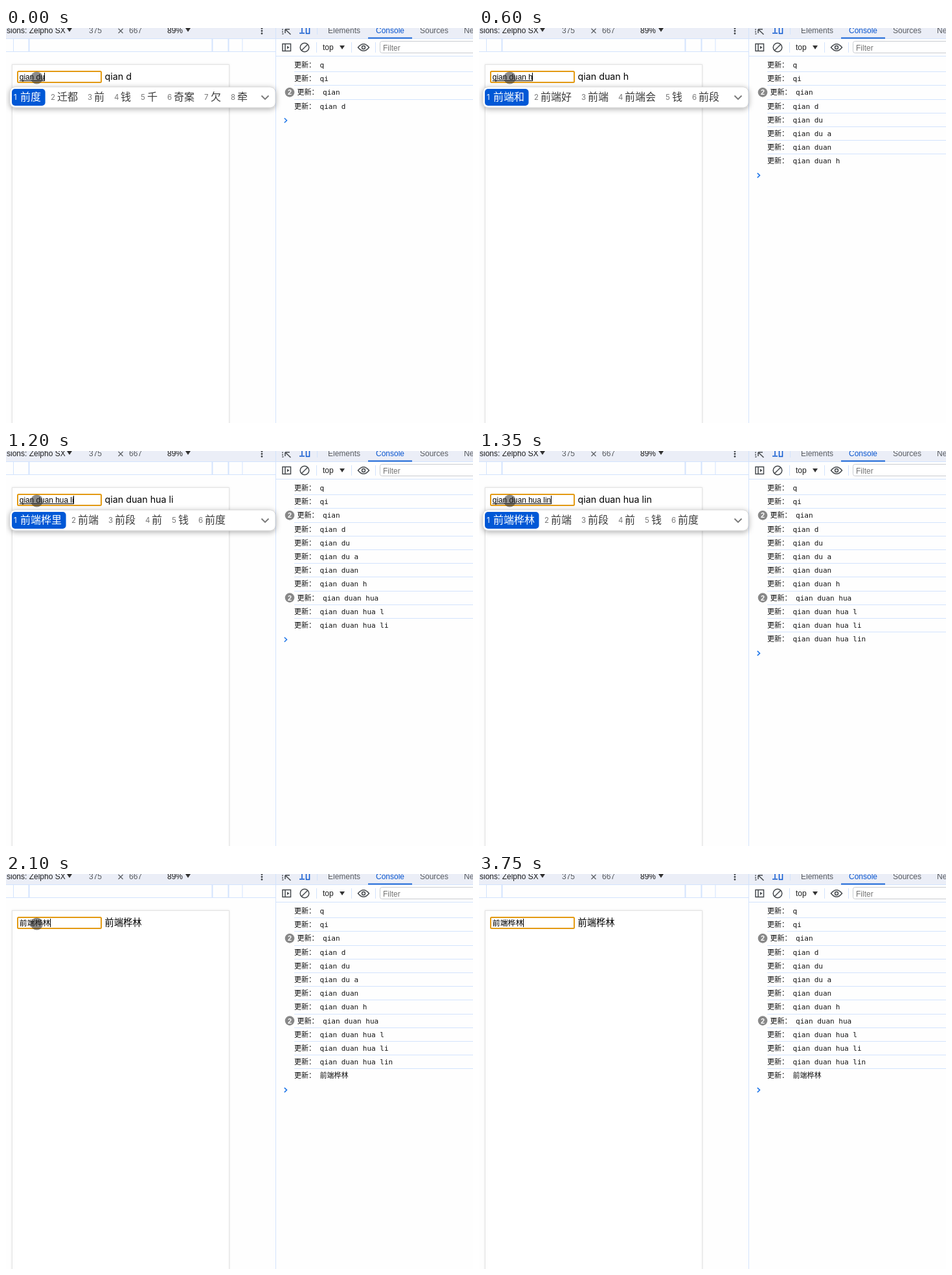
An HTML page that plays this animation: 721 px wide and 610 px high, repeating every 3770 ms.

```html
<!DOCTYPE html>
<html lang="zh">
<head>
<meta charset="utf-8">
<title>Input method and console log</title>
<style>
  html, body { margin: 0; width: 721px; height: 610px; overflow: hidden; background: #fff; }
  svg { display: block; }
  text { font: 12px "Liberation Sans", "Noto Sans CJK SC", "Noto Sans CJK", sans-serif; fill: #1f1f1f; white-space: pre; }
  #typed { font-size: 11.87px; fill: #000; }
  #shown { font: 14.24px Inter, "Noto Sans CJK SC", "Noto Sans CJK", sans-serif; fill: #000; }
  #log text { font: 11px "DejaVu Sans Mono", "Noto Sans CJK SC", "Noto Sans CJK", monospace; fill: #111; }
  #log .count { font: bold 11px "Liberation Sans", sans-serif; fill: #fff; text-anchor: middle; }
  #items text { font-size: 16px; fill: #3c3c3c; }
  #items .num { font: 11.5px Inter, sans-serif; fill: #777; }
  #items .picked { fill: #fff; }
  .dim { fill: #5a5d61; }
  .rule { stroke: #d3e3fd; }
  .icon { fill: none; stroke: #45494d; stroke-width: 1.5; }
</style>
</head>
<body>
<svg width="721" height="610" viewBox="0 0 721 610">
  <defs>
    <filter id="soft" x="-10%" y="-60%" width="120%" height="240%">
      <feDropShadow dx="0" dy="2" stdDeviation="4" flood-color="#000" flood-opacity=".33"/>
    </filter>
    <filter id="faint" x="-5%" y="-5%" width="110%" height="110%">
      <feDropShadow dx="0" dy="0" stdDeviation="1.5" flood-color="#000" flood-opacity=".1"/>
    </filter>
  </defs>

  <!-- device bar and ruler -->
  <rect width="721" height="610" fill="#fefefe"/>
  <rect width="721" height="16" fill="#ebeef7"/>
  <g class="rule">
    <path d="M0 16.5H721M0 36.5H416M11.5 17V36M365 17V36M417 43.5H721"/>
    <path d="M35.5 17V36M318.5 17V36M343.5 17V36" stroke-width="2"/>
  </g>
  <text x="1" y="7.5">sions: Zelpho SX</text>
  <text x="128" y="7.5" class="dim">375</text>
  <path d="M173.5 1L180.5 8M180.5 1L173.5 8" stroke="#5a5d61" stroke-width="1.2"/>
  <text x="190" y="7.5" class="dim">667</text>
  <text x="249" y="7.5">89%</text>
  <path d="M94 0H102L98 6ZM277 0H285L281 6ZM515 27H523L519 33Z" fill="#333"/>
  <g fill="#45494d"><circle cx="395" cy=".5" r="1.4"/><circle cx="395" cy="4.5" r="1.4"/><circle cx="395" cy="8.5" r="1.4"/></g>

  <!-- page -->
  <rect x="9.5" y="56.5" width="335" height="570" fill="#fff" stroke="#e4e4e4" filter="url(#faint)"/>
  <rect x="18" y="67" width="129" height="17" rx="1.5" fill="#fff" stroke="#e39a13" stroke-width="2"/>
  <text id="typed" x="20.8" y="79.5"/>
  <path id="underline" stroke="#000"/>
  <path id="caret" stroke="#000"/>
  <text id="shown" x="152.6" y="79.8"/>

  <!-- developer panel -->
  <path class="rule" d="M416.5 0V610"/>
  <g class="icon">
    <path d="M427 -2V9H430" stroke-dasharray="2 1.5"/>
    <path d="M431 2L439.5 10M431 2V8M431 2H438"/>
    <path d="M457 -1V7M453 8H461M468.5 0V8.5H463.5V0" stroke="#0b57d0"/>
    <path d="M427 24.5H439.5V35.5H427ZM431 24.5V35.5"/>
    <path d="M434 27.5L437.5 30L434 32.5Z" fill="#45494d" stroke="none"/>
    <circle cx="461" cy="30" r="6.8"/><path d="M456.2 34.8L465.8 25.2"/>
    <path d="M543.5 30Q552 19.5 560.5 30Q552 40.5 543.5 30Z"/><circle cx="552" cy="30" r="2.5"/>
  </g>
  <path class="rule" d="M480.5 0V10M479.5 22V38M533.5 22V38M570.5 22V38"/>
  <text x="497" y="7.5" class="dim">Elements</text>
  <text x="571" y="7.5" style="fill:#0b57d0">Console</text>
  <text x="639" y="7.5" class="dim">Sources</text>
  <text x="707" y="7.5" class="dim">Network</text>
  <rect x="559" y="14.5" width="68" height="2" fill="#1a66d6"/>
  <text x="489" y="34">top</text>
  <rect x="577.5" y="20.5" width="160" height="18" rx="3" fill="#fff" stroke="#c9ccd1"/>
  <text x="582" y="35" style="fill:#757575">Filter</text>
  <g id="log"></g>
  <path id="prompt" d="M429.8 -3.5L433.5 0L429.8 3.5" fill="none" stroke="#1a73e8" stroke-width="1.5"/>

  <!-- candidate window -->
  <g id="popup">
    <rect x="6" y="91" width="410" height="32" rx="8" fill="#fff" stroke="#c4c4c4" stroke-width=".7" filter="url(#soft)"/>
    <rect id="pick" x="9" y="94" height="26" rx="5" fill="#0058d6"/>
    <g id="items"></g>
    <path d="M394.5 104.5L400 110L405.5 104.5" fill="none" stroke="#777" stroke-width="1.8"/>
  </g>

  <circle id="press" cx="47.5" cy="77" r="9.5" fill="#222" fill-opacity=".52"/>
  <path id="arrow" d="M1.3 .8V14.3L4.3 11.5L6.6 16.3L9 15.300L6.8 10.600H10.800Z" fill="#000" stroke="#fff"/>
</svg>
<script>
const LOOP = 3770, ROW = 21.2;
const $ = id => document.getElementById(id);

const entries = ["q", "qi", "qian", "qian d", "qian du", "qian du a", "qian duan", "qian duan h",
  "qian duan hua", "qian duan hua l", "qian duan hua li", "qian duan hua lin", "前端桦林"];
const repeated = ["qian", "qian duan hua"];
const endings = " 前端 前段 前 钱 前度";

// The page text shows the newest log entry unless a step says otherwise.
const steps = [
  { at: 0, rows: 4, typed: "qian du", items: "前度 迁都 前 钱 千 奇案 欠 牵" },
  { at: 150, rows: 4, typed: "qian du a", items: "前度啊 前度 迁都 前 钱 千" },
  { at: 300, rows: 6, typed: "qian duan", items: "前端 前端桦林 前段 浅短 前 钱" },
  { at: 450, rows: 7, typed: "qian duan", items: "前端 前端桦林 前段 浅短 前 钱" },
  { at: 600, rows: 8, typed: "qian duan h", items: "前端和 前端好 前端 前端会 钱 前段" },
  { at: 750, rows: 8, typed: "qian duan hua", items: "前端桦" + endings },
  { at: 900, rows: 9, typed: "qian duan hua l", items: "前端桦林" + endings },
  { at: 1050, rows: 10, typed: "qian duan hua l", items: "前端桦林" + endings },
  { at: 1200, rows: 11, typed: "qian duan hua li", items: "前端桦里" + endings },
  { at: 1350, rows: 12, typed: "qian duan hua lin", items: "前端桦林" + endings },
  { at: 1950, rows: 12, typed: "前端桦林", shown: "前端桦林" },
  { at: 2100, rows: 13, typed: "前端桦林" },
  { at: 3000, rows: 13, typed: "前端桦林", arrow: [419, 436] },
  { at: 3150, rows: 13, typed: "前端桦林", arrow: [433, 448] },
  { at: 3300, rows: 13, typed: "前端桦林", arrow: [640, 565] },
  { at: 3450, rows: 13, typed: "前端桦林", arrow: [709.5, 604] },
  { at: 3600, rows: 13, typed: "前端桦林" }
];

function add(parent, tag, attrs, text = "") {
  const node = document.createElementNS(parent.namespaceURI, tag);
  for (const key in attrs) node.setAttribute(key, attrs[key]);
  node.textContent = text;
  return parent.appendChild(node);
}

const show = (node, on) => { node.style.display = on ? "" : "none"; };

// Each row after the first carries the rule that separates it from the one above.
const rows = entries.map((entry, i) => {
  const group = add($("log"), "g", {});
  const y = 57 + ROW * i;
  const many = repeated.includes(entry);
  const x = many ? 449.5 : 445;
  if (many) {
    add(group, "circle", { cx: 438, cy: y, r: 7.3, fill: "#888" });
    add(group, "text", { x: 438, y: y + 4, class: "count" }, "2");
  }
  add(group, "text", { x, y: y + 4 }, "更新：");
  add(group, "text", { x: x + 39.6, y: y + 4 }, entry);
  if (i) add(group, "path", { class: "rule", d: `M445 ${Math.floor(y - 10.6) + 0.5}H721` });
  return group;
});

function drawItems(list) {
  $("items").textContent = "";
  let x = 12;
  list.split(" ").forEach((word, i) => {
    const picked = i ? "" : " picked";
    add($("items"), "text", { x, y: 111, class: "num" + picked }, i + 1);
    add($("items"), "text", { x: x + 10, y: 112.4, class: picked }, word);
    if (!i) $("pick").setAttribute("width", 19.6 + 16 * word.length);
    x += 25 + 16 * word.length;
  });
}

function draw(step) {
  $("typed").textContent = step.typed;
  const end = 20.8 + $("typed").getComputedTextLength();
  $("caret").setAttribute("d", `M${Math.floor(end) + 0.5} 69V82`);
  $("underline").setAttribute("d", `M20.8 81.5H${end}`);
  $("shown").textContent = step.shown || entries[step.rows - 1];
  rows.forEach((row, i) => show(row, i < step.rows));
  $("prompt").setAttribute("transform", `translate(0 ${58 + ROW * step.rows})`);
  show($("popup"), step.items);
  show($("underline"), step.items);
  if (step.items) drawItems(step.items);
  show($("press"), step.at < 3000);
  show($("arrow"), step.arrow);
  if (step.arrow) $("arrow").setAttribute("transform", `translate(${step.arrow})`);
}

const start = performance.now();
let current;
function tick() {
  const time = (performance.now() - start) % LOOP;
  const step = steps.findLast(s => s.at <= time);
  if (step !== current) draw(current = step);
  requestAnimationFrame(tick);
}
tick();
</script>
</body>
</html>
```
